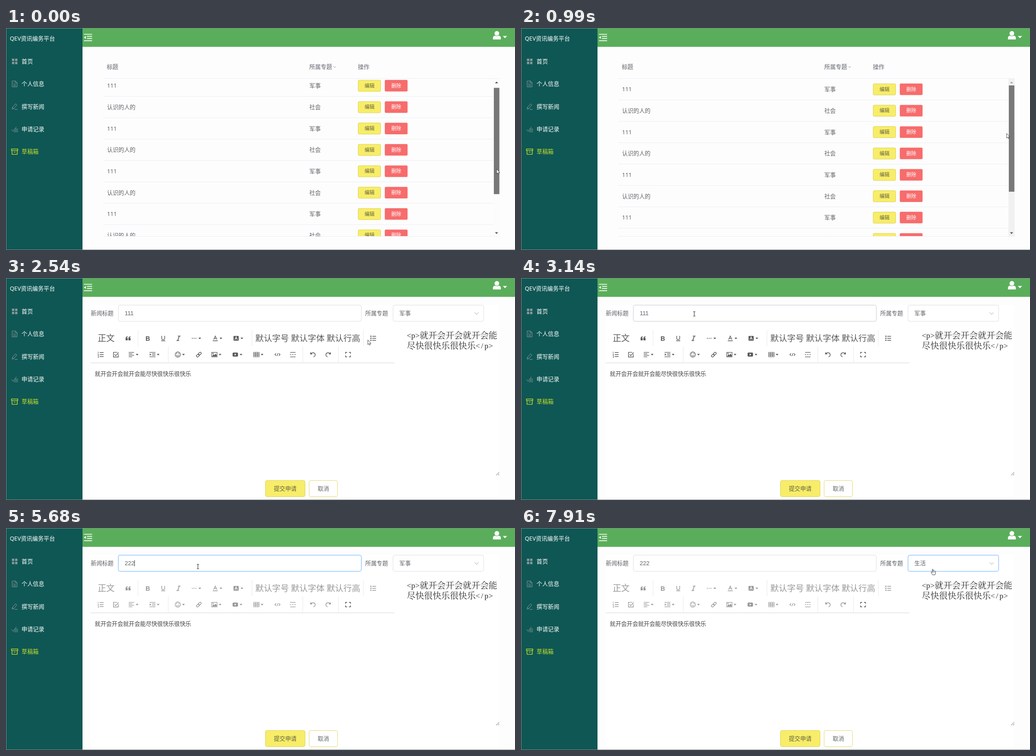
An HTML page for the animation above (8000 ms loop, 1131 by 495 pixels).

```html
<!DOCTYPE html>
<html lang="zh-CN">
<head>
<meta charset="utf-8">
<title>草稿箱</title>
<style>
html, body { margin: 0; width: 100%; height: 100%; overflow: hidden; background: #fdfdfd; }
svg { display: block; width: 1131px; height: 495px; }
text { font-family: "Noto Sans", "Noto Sans CJK SC", "Noto Sans CJK", sans-serif; white-space: pre; }
.arial { font-family: "Liberation Sans", Arial, "Noto Sans CJK SC", sans-serif; }
.serif { font-family: "Liberation Serif", "Noto Serif CJK SC", "Noto Sans CJK SC", serif; font-weight: 300; }
.tag { text-anchor: middle; }
</style>
</head>
<body>
<svg id="stage" viewBox="0 0 1131 495" xmlns="http://www.w3.org/2000/svg"></svg>
<script>
const LOOP = 8000, ROW = 47.67, MAX_SCROLL = 125.6;
const INK = '#606266', YELLOW = '#f8ed68', EDGE = '#ddd257', BLUE = '#66b1ff';
const $ = id => document.getElementById(id);

const rect = (x, y, w, h, fill, more = '') =>
  `<rect x="${x}" y="${y}" width="${w}" height="${h}" fill="${fill}" ${more}/>`;
const path = (d, stroke, width = 1, more = '') =>
  `<path d="${d}" fill="none" stroke="${stroke}" stroke-width="${width}" ${more}/>`;
const solid = (d, fill, more = '') => `<path d="${d}" fill="${fill}" ${more}/>`;
// text placed by its left edge and vertical centre
const text = (x, cy, str, size = 12.65, fill = INK, more = '') =>
  `<text x="${x}" y="${(cy + size * 0.37).toFixed(2)}" font-size="${size}" fill="${fill}" ${more}>${str}</text>`;
const group = (body, more = '') => `<g ${more}>${body}</g>`;
const at = (x, y, body) => group(body, `transform="translate(${x} ${y})"`);

function sidebar() {
  const gray = '#8b9a9c', lime = '#c6de2c';
  const icons = [
    [-6, 1].map(x => [-6, 1].map(y => rect(x, y, 5.2, 5.2, gray)).join('')).join(''),
    path('M-5.5-6.5H2L5.5-3V6.5H-5.5ZM1.5-6.5V-2.5H5.5M-3-2H-1M-3 1H3M-3 4H3', gray),
    path('M-5.5 6L-5 2L2-6L5-3.5L-2 5ZM-5 2L-2 5M0 6.5H6.5', gray),
    path('M-7 1L-3.5 5L4-5M1 0H7.5M-.5 3H7.5M-1.5 6H7.5', gray),
    path('M-7-6H7V-2.5H-7ZM-5.8-2.5V6H5.8V-2.5M-2 1H2', lime, 1.4)
  ];
  const names = ['首页', '个人信息', '撰写新闻', '申请记录', '草稿箱'];
  return rect(0, 0, 170, 495, '#0f5754') + text(8.5, 23.5, 'QEV资讯编务平台', 12.65, '#fff') +
    names.map((name, i) => at(19.2, 74.4 + i * 50.3, icons[i] +
      text(15.3, 0, name, 12.65, i === 4 ? lime : '#fff'))).join('');
}

function topbar() {
  return rect(170, 0, 961, 42, '#5aae5b') +
    path('M173.3 14H191.3M180 18.7H191.3M180 23.4H191.3M173.3 28.3H191.3', '#fff', 1.7) +
    solid('M173 21L177.5 17.7V24.3Z', '#fff') +
    `<circle cx="1090.7" cy="12" r="5.2" fill="#fff"/>` +
    solid('M1082 25.5V22Q1082 17.3 1087 17.3Q1090.7 19.2 1094.5 17.3Q1099.5 17.3 1099.5 22V25.5Z', '#fff') +
    solid('M1104 17.7H1113.4L1108.7 22.8Z', '#fff');
}

function tableRow(i) {
  const last = i === 9, odd = i % 2;
  const title = last ? '不用洗发水，只用清水洗头，这些年头发保养方法又翻新了' : odd ? '认识的人的' : '111';
  const topic = last ? '生活' : odd ? '社会' : '军事';
  return at(0, 112.8 + i * ROW,
    rect(216, 0, 867, ROW, 'none', `id="row${i}"`) +
    path(`M216 ${ROW}H1083`, '#ebeef5') +
    text(224.5, 23.8, title) + text(674, 23.8, topic) +
    rect(782.5, 11.5, 50, 25, YELLOW, `rx="2.5" stroke="${EDGE}"`) +
    text(796.7, 23.8, '编辑', 11.1, '#5f6043') +
    rect(841.7, 11, 50.6, 25.8, '#f76c6c', 'rx="2.5"') +
    text(855.9, 23.8, '删除', 11.1, '#fff'));
}

function listPage() {
  const bold = 'font-weight="700"', gray = '#909399';
  return text(224, 86.7, '标题', 12.65, gray, bold) + text(674, 86.7, '所属专题', 12.65, gray, bold) +
    path('M727.5 85.5L730.3 88.3L733.1 85.5', gray) + text(782, 86.7, '操作', 12.65, gray, bold) +
    group(group(Array.from({ length: 10 }, (_, i) => tableRow(i)).join(''), 'id="rows"'), 'clip-path="url(#view)"') +
    path('M216 112.7H1097M216 464.5H1097', '#ebeef5') +
    rect(1083, 113.3, 14, 351, '#f1f1f1', 'id="track"') +
    rect(1084, 128, 12.3, 237, '#787878', 'id="thumb"') +
    solid('M1086.5 123.2H1093.5L1090 119.5Z', '#505050', 'id="up"') +
    solid('M1086.5 455.5H1093.5L1090 459.2Z', '#505050', 'id="down"');
}

function toolbar() {
  const c = 'currentColor';
  const caret = (x, y = 0) => solid(`M${x - 3} ${y - 1.6}h6l-3 3.6Z`, c);
  const list = marks => path('M-2-4.5H6.5M-2 0H6.5M-2 4.5H6.5', c, 1.5) + marks;
  const dots = (r, xs, ys) => xs.map(x => ys.map(y => `<circle cx="${x}" cy="${y}" r="${r}" fill="${c}"/>`).join('')).join('');
  const latin = (str, size, more) => text(0, 0, str, size, c, `text-anchor="middle" class="arial" ${more}`);
  const quote = 'M-5.5 4.5V0Q-5.5-4-1-4.5V-2.7Q-3-2-3-.5H-.8V4.5Z';
  const turn = 'M-5-5V-1.3H-1.3M-5-1.5Q-1.5-5.5 2.5-3.8Q6 -2 5 2Q4 4.6 1.5 5';
  const row1 = [
    [271.3, solid(quote, c) + at(6.3, 0, solid(quote, c))],
    [315, latin('B', 14, 'font-weight="700"')],
    [349.3, path('M-3.3-5.5V0Q-3.3 3 0 3Q3.3 3 3.3 0V-5.5M-4.5 5.5H4.5', c, 1.4)],
    [383.3, path('M-1.5-5H4.5M-4.5 5H1.5M1.8-5L-1.8 5', c, 1.7)],
    [418, dots(1.1, [-4, 0, 4], [0]) + caret(12.6)],
    [465, path('M-3.8 3L0-5.2L3.8 3M-2.5 0H2.5M-5.5 5.5H5.5', c, 1.3) + caret(12.5)],
    [511.3, rect(-5.7, -5.2, 11.4, 10.4, c, 'rx="1"') + path('M-2.8 3L0-3.2L2.8 3M-1.7 1H1.7', '#fff', 1.2) + caret(12.8)],
    [815.8, list(dots(1.4, [-5], [-4.5, 0, 4.5]))]
  ];
  const row2 = [
    [210.3, list(path('M-5.5-6.5V-2.8M-6.5-1H-4.5L-6 1.4H-4.3M-6.3 3.2H-4.5V6.5H-6.3', c, 1))],
    [244.3, path('M5.2-1V5.5H-5.5V-5.2H3M-3-.5L-.5 2.3L6-4.8', c, 1.4)],
    [278.6, path('M-6-5H6M-6-1.7H2M-6 1.6H6M-6 4.9H2', c, 1.3) + caret(12.8)],
    [325.5, path('M-6.5-5H6.5M-1-1.7H6.5M-1 1.6H6.5M-6.5 4.9H6.5', c, 1.3) + solid('M-6-2.5V2.5L-2.5 0Z', c) + caret(12.6)],
    [381.8, `<circle r="5.8" fill="none" stroke="${c}" stroke-width="1.3"/>` + dots(1, [-2.2, 2.2], [-1.7]) + path('M-3.2 1.3Q0 5.3 3.2 1.3', c, 1.2) + caret(12.6)],
    [428.5, group(rect(-6.5, -2.3, 7, 4.6, 'none', `rx="2.3" stroke="${c}" stroke-width="1.4"`) +
      rect(-.5, -2.3, 7, 4.6, 'none', `rx="2.3" stroke="${c}" stroke-width="1.4"`), 'transform="rotate(-45)"')],
    [463, path('M-6-5H6V5H-6Z', c, 1.2) + solid('M-5 4L-2-1L0 1.5L2.5-2L5 1V4Z', c) + dots(1.2, [-3], [-2.5]) + caret(12.6)],
    [509.5, rect(-6, -4.5, 12, 9, c, 'rx="2"') + solid('M-1.5-2.3V2.3L2.3 0Z', '#fff') + caret(12.7)],
    [556.4, path('M-6-5H6V5H-6ZM-6-1.7H6M-6 1.6H6M-2-5V5M2-5V5', c, 1.1) + caret(12.6)],
    [603.2, path('M-3-2.8L-5.8 0L-3 2.8M3-2.8L5.8 0L3 2.8M1-3.2L-1 3.2', c, 1.3)],
    [637.3, path('M-6-5H6M-6 5H6', c, 1.3) + path('M-6.5 0H6.5', c, 1.3, 'stroke-dasharray="3 2"')],
    [681.8, path(turn, c, 1.5)],
    [716, group(path(turn, c, 1.5), 'transform="scale(-1 1)"')]
  ];
  const put = (row, y) => row.map(([x, body]) => at(x, y, body)).join('');
  return group(put(row1, 134.5) + put(row2, 170.8) + text(203.7, 134.3, '正文', 18.9, c) +
      ['默认字号', '默认字体', '默认行高'].map((s, i) => text(554 + i * 79.2, 134.3, s, 18.7, c)).join(''), 'id="tools"') +
    at(760, 170.8, path('M-5.5-2V-5H-2M2-5H5.5V-2M5.5 2V5H2M-2 5H-5.5V2', '#595959', 1.5)) +
    path('M293.5 116V152M546.5 116V152M794 116V152M360.5 153V188M659.5 153V188M738.5 153V188', '#e8e8e8') +
    path('M188 189.2H863', '#d6d6d6');
}

function dropdown() {
  return rect(860.5, 107.5, 201, 103, '#fff', 'rx="3.5" stroke="#e4e7ed" filter="url(#soft)"') +
    solid('M886 107.6L891.5 102L897 107.6Z', '#fff') + path('M886 107.5L891.5 102L897 107.5', '#e4e7ed') +
    rect(861, 113, 200, 31, '#f5f7fa', 'id="pick"') +
    ['军事', '社会', '生活'].map((s, i) =>
      text(878, 128.5 + i * 31, s, 12.65, INK, `id="opt${i}"`)).join('');
}

function htmlSource() {
  const ink = '#2a2a2a', half = 9.55;
  // each half-width character is centred in its own cell
  const tag = (x, cy, chars) => text(chars.map((_, i) => (x + (i + .5) * half).toFixed(1)).join(' '),
    cy, chars.join(''), 17.2, ink, 'class="serif tag"');
  const cjk = (x, cy, str) => text(x, cy, str, 19.15, ink, 'class="serif"');
  return tag(890.5, 128, ['&lt;', 'p', '&gt;']) + cjk(919.3, 128, '就开会开会就开会能') +
    cjk(890.5, 151, '尽快很快乐很快乐') + tag(1043.6, 151, ['&lt;', '/', 'p', '&gt;']);
}

function editPage() {
  return rect(188, 60, 908, 428, '#fff') + text(188.3, 78.4, '新闻标题') + text(798.3, 78.4, '所属专题') +
    rect(249.5, 60.5, 540, 36, '#fff', 'rx="3.6" id="title"') +
    text(263.7, 78, '', 13, INK, 'class="arial" id="value"') +
    rect(285, 71.5, 1, 14, '#333', 'id="bar"') +
    rect(860, 60.5, 201.3, 36, '#fff', 'rx="3.6" id="select"') +
    text(874, 78.4, '', 12.65, INK, 'id="topic"') +
    at(1045.7, 78.8, path('M-4.5-2.2L0 2.3L4.5-2.2', '#c0c4cc', 1.2, 'id="chev"')) +
    toolbar() + text(197.3, 213.8, '就开会开会就开会能尽快很快乐很快乐', 12.6, '#444') + htmlSource() +
    path('M1089 440L1096 433M1093 440L1096 437', '#666') +
    rect(576.5, 451.5, 88, 36, YELLOW, `rx="3.6" stroke="${EDGE}"`) + text(595.2, 469.8, '提交申请', 12.65, '#5f6043') +
    rect(673.5, 451.5, 63, 36, '#fff', 'rx="3.6" stroke="#e2da6c"') + text(692.5, 469.8, '取消') +
    group(dropdown(), 'id="menu"');
}

function pointers() {
  const arrow = 'M0 0V10.5L2.4 8.3L4 11.8L5.6 11L4.1 7.7H7.2Z';
  const hand = 'M-.9 .8Q0-.6 .9 .8V5L1 3.8Q2.5 3.2 2.8 4.2Q4.3 3.6 4.6 4.8Q6.3 4.3 6.4 6V9Q6.2 11 5.2 13H-.4Q-2 10.5-3.5 7.8Q-3.6 6.2-2 6.9L-.9 8Z';
  return group(solid(arrow, '#fff', 'stroke="#222" stroke-width=".8"'), 'id="arrow"') +
    group(solid(hand, '#fff', 'stroke="#333" stroke-width=".9"') + path('M1 5V8M2.8 5V8M4.6 5.5V8', '#555', .6), 'id="hand"') +
    group(path('M-2.5-5H-.8L0-4.5L.8-5H2.5M0-4.5V4.5M-2.5 5H-.8L0 4.5L.8 5H2.5', '#333', 1.1), 'id="beam"') +
    group('<circle r="4.3" fill="#fff" stroke="#b5122b" stroke-width="1.7"/>' + path('M-3-3L3 3', '#b5122b', 1.6), 'id="ban"');
}

$('stage').innerHTML =
  '<defs><clipPath id="view"><rect x="215" y="113" width="868" height="351.5"/></clipPath>' +
  '<filter id="soft" x="-10%" y="-10%" width="120%" height="130%"><feDropShadow dx="0" dy="2" stdDeviation="4" flood-opacity=".1"/></filter></defs>' +
  rect(0, 0, 1131, 495, '#fdfdfd') + sidebar() + topbar() +
  group(listPage(), 'id="list"') + group(editPage(), 'id="edit"') +
  path('M0 .5H1131M.5 0V495M0 494.5H1131', '#7f8a86') + pointers();

const SCROLL = [[0, 8], [120, 48], [250, 98], [380, MAX_SCROLL], [870, 58], [990, 0]];
const HOVER = [[0, -1], [1120, 2], [1250, 1], [1640, 0], [2540, -1]];
const TITLE = [[0, '111'], [3930, '11'], [4070, '1'], [4200, ''], [4910, '2'], [5030, '22'], [5310, '222']];
const MENU = [[0, 0], [6210, .45], [6350, .9], [6480, 1], [7640, .85], [7780, .3], [7910, 0]];
const POINTER = [
  [0, 'arrow', 1090, 314.5], [120, 'arrow', 1090, 340], [250, 'arrow', 1088, 374], [380, 'arrow', 1086, 394],
  [750, 'arrow', 1081, 378.5], [870, 'arrow', 1080, 300], [990, 'arrow', 1079, 235], [1120, 'arrow', 1040, 222],
  [1250, 'arrow', 960, 205], [1370, 'arrow', 890, 186], [1500, 'arrow', 840, 166], [1640, 'arrow', 812, 152],
  [1770, 'hand', 805, 143], [1890, 'hand', 805, 136], [2140, 'ban', 806, 141], [2540, 'arrow', 804, 138],
  [2660, 'arrow', 745, 122], [2780, 'arrow', 640, 105], [2900, 'beam', 510, 90], [3020, 'beam', 425, 84],
  [3140, 'beam', 385, 80], [3260, 'beam', 366, 80], [3380, 'beam', 360, 81], [3500, 'beam', 372, 82],
  [3650, 'beam', 404, 83], [5680, 'beam', 426.5, 86], [5830, 'beam', 560, 84], [5950, 'beam', 700, 82],
  [6070, 'hand', 865, 80], [6210, 'hand', 920, 78], [6350, 'hand', 928, 110], [6480, 'hand', 934, 152],
  [6620, 'hand', 935, 187], [6740, 'hand', 937, 189], [6860, 'hand', 936, 190], [7780, 'hand', 926, 140],
  [7910, 'hand', 914.8, 91.5]
];

const pick = (keys, t) => keys.reduce((best, k) => k[0] <= t ? k : best);
const set = (id, name, value) => $(id).setAttribute(name, value);
const show = (id, on) => set(id, 'display', on ? 'inline' : 'none');

function drawList(t) {
  const scroll = pick(SCROLL, t)[1], hover = pick(HOVER, t)[1];
  set('rows', 'transform', `translate(0 ${-scroll})`);
  for (let i = 0; i < 3; i++)
    set('row' + i, 'fill', i === hover ? '#f5f7fa' : i === 1 && hover === 0 ? '#f9fafc' : 'none');
  set('track', 'fill', t < 120 ? '#fcfcfc' : '#f1f1f1');
  set('thumb', 'y', 128 + scroll / MAX_SCROLL * 85);
  set('thumb', 'fill', t < 1120 ? '#787878' : '#c1c1c1');
  set('up', 'fill', scroll > 0 ? '#505050' : '#a3a3a3');
  set('down', 'fill', scroll < MAX_SCROLL ? '#505050' : '#a3a3a3');
}

function drawEdit(t, py) {
  const value = pick(TITLE, t)[1], open = pick(MENU, t)[1];
  const typing = t >= 3500 && t < 6210, chosen = t >= 7640;
  $('value').textContent = value;
  show('bar', typing && t >= 3930 && !(t >= 4480 && t < 4910));
  set('bar', 'x', 263.5 + value.length * 7.23);
  set('title', 'stroke', typing ? BLUE : t >= 2900 && t < 3500 ? '#c8ccd3' : '#dcdfe6');
  set('select', 'stroke', t >= 6210 ? BLUE : t >= 6070 ? '#c0c4cc' : '#dcdfe6');
  $('topic').textContent = chosen ? '生活' : '军事';
  set('chev', 'transform', t >= 6210 && !chosen ? 'rotate(180)' : 'rotate(0)');
  set('tools', 'color', t >= 3500 ? '#999' : '#595959');
  show('menu', open > 0);
  set('menu', 'opacity', open);
  set('menu', 'transform', `translate(0 ${102 * (1 - open)}) scale(1 ${open})`);
  const item = Math.max(0, Math.min(2, Math.floor((py - 113) / 31)));
  set('pick', 'y', 113 + item * 31);
  for (let i = 0; i < 3; i++) {
    const on = i === (chosen ? 2 : 0);
    set('opt' + i, 'fill', on ? '#409eff' : INK);
    set('opt' + i, 'font-weight', on ? 700 : 400);
  }
}

function draw(t) {
  const [, kind, px, py] = pick(POINTER, t), editing = t >= 2540;
  show('list', !editing);
  show('edit', editing);
  if (editing) drawEdit(t, py); else drawList(t);
  for (const id of ['arrow', 'hand', 'beam', 'ban']) show(id, id === kind);
  set(kind, 'transform', `translate(${px} ${py})`);
}

let start = null;
function tick(now) {
  if (start === null) start = now;
  draw((now - start) % LOOP);
  requestAnimationFrame(tick);
}
draw(0);
requestAnimationFrame(tick);
</script>
</body>
</html>
```
